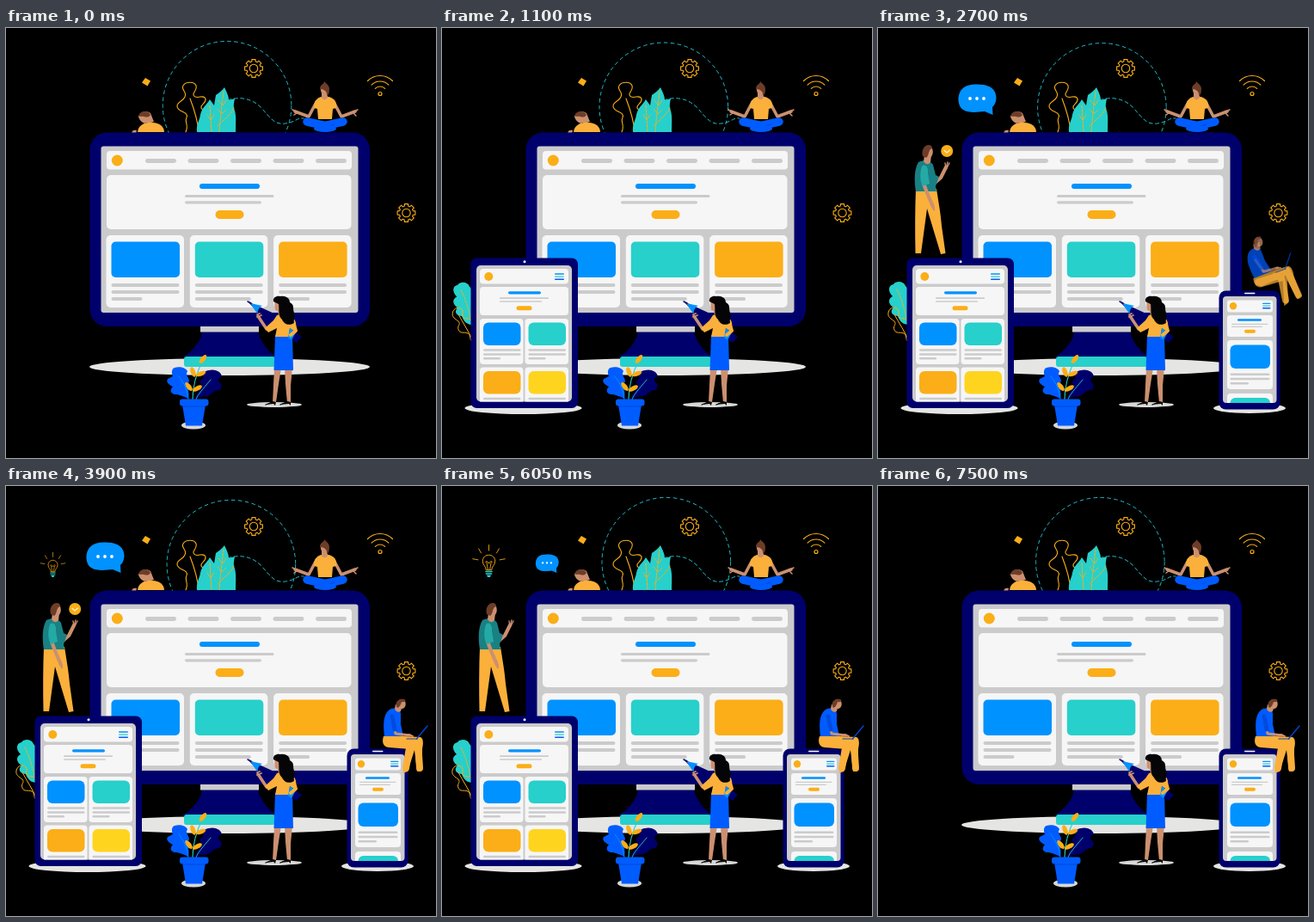
An HTML page with a canvas for the animation above (7.55 s loop, 500 by 500 pixels).

```html
<!DOCTYPE html>
<html lang="en">
<head>
<meta charset="utf-8">
<title>Responsive design</title>
<style>
html, body { margin: 0; width: 100%; height: 100%; overflow: hidden; background: #000; }
canvas { display: block; width: 100vw; height: 100vh; }
</style>
</head>
<body>
<canvas id="stage"></canvas>
<script>
const LOOP = 7550, STEP = 50;
const NAVY = '#00006c', BLUE = '#0092ff', ROYAL = '#005cff', TEAL = '#27d0cb',
  ORANGE = '#fbae17', SHIRT = '#fbb03b', YELLOW = '#ffd41f', PAPER = '#f6f6f7',
  GRAY = '#cbcbcc', FLOOR = '#e5e5e3', SKIN = '#cc906f', HAIR = '#6d3d28';
const canvas = document.getElementById('stage');
const c = canvas.getContext('2d');
const dpr = window.devicePixelRatio || 1;
canvas.width = canvas.height = 500 * dpr;

const clamp = v => Math.max(0, Math.min(1, v));
function ease(t, a, b) {
  const p = clamp((t - a) / (b - a));
  return p * p * (3 - 2 * p);
}
const span = (t, a, b, d, e) => ease(t, a, b) * (1 - ease(t, d, e));

function rect(x1, y1, x2, y2, r, color) {
  c.fillStyle = color;
  c.beginPath();
  c.roundRect(x1, y1, x2 - x1, y2 - y1, r);
  c.fill();
}
function bar(x1, x2, y, h, color = GRAY) {
  rect(x1, y - h / 2, x2, y + h / 2, h / 2, color);
}
function oval(x, y, rx, ry, color, turn = 0) {
  c.fillStyle = color;
  c.beginPath();
  c.ellipse(x, y, rx, ry, turn, 0, 7);
  c.fill();
}
const dot = (x, y, r, color) => oval(x, y, r, r, color);
function fill(d, color) {
  c.fillStyle = color;
  c.fill(new Path2D(d));
}
function line(d, color, w = 1, dash = []) {
  c.strokeStyle = color;
  c.lineWidth = w;
  c.lineCap = 'round';
  c.lineJoin = 'round';
  c.setLineDash(dash);
  c.stroke(new Path2D(d));
  c.setLineDash([]);
}
// Draws a group scaled, turned and faded about a pivot
function group(x, y, scale, turn, alpha, draw) {
  if (scale <= 0.002 || alpha <= 0) return;
  c.save();
  c.translate(x, y);
  c.rotate(turn * Math.PI / 180);
  c.scale(scale, scale);
  c.translate(-x, -y);
  c.globalAlpha = alpha;
  draw();
  c.restore();
}

function orbit(t) {
  const a = t / 9000 * 2 * Math.PI;
  c.strokeStyle = '#22bccb';
  c.lineWidth = 1;
  c.lineCap = 'butt';
  c.setLineDash([4.5, 3.5]);
  c.beginPath();
  c.arc(259.6 - 2.5 * Math.cos(a), 90.2 + 2.3 * Math.sin(a), 74.8, 0, 2 * Math.PI);
  c.stroke();
  c.setLineDash([]);
  line('M258 84C271 79 287 82 297 93S312 113 325 111S338 104 346 105', '#22bccb', 1, [4, 3.5]);
}

function gear(x, y) {
  c.strokeStyle = ORANGE;
  c.lineWidth = 1.1;
  c.lineJoin = 'round';
  c.beginPath();
  for (let i = 0; i < 8; i++) {
    const a = i * Math.PI / 4 - Math.PI / 2;
    for (const [da, r] of [[-.27, 8.2], [-.2, 10.6], [.2, 10.6], [.27, 8.2]])
      c.lineTo(x + r * Math.cos(a + da), y + r * Math.sin(a + da));
  }
  c.closePath();
  c.stroke();
  c.beginPath();
  c.arc(x, y, 4.7, 0, 7);
  c.stroke();
}

function wifi() {
  c.strokeStyle = ORANGE;
  c.lineWidth = 1.2;
  c.lineCap = 'round';
  for (const r of [8, 14, 20.5]) {
    c.beginPath();
    c.arc(435, 76, r, -Math.PI * .75, -Math.PI * .25);
    c.stroke();
  }
  c.beginPath();
  c.arc(435, 76.5, 2, 0, 7);
  c.stroke();
}

function topPlants() {
  line('M209 121C213 113 207 109 210 104C213 97 199 98 199 91C199 85 206 86 208 80C211 74 203 72 206 67C209 62 219 62 221 67C223 73 214 77 220 80C225 82 229 77 232 82C233 88 226 88 227 93C229 98 234 94 232 98', ORANGE, 1.1);
  line('M214 82C219 95 223 107 224 121', ORANGE, 1.1);
  fill('M222 121C221 112 225 108 226 101C228 92 233 90 237 83L242 90L244 78C248 75 251 73 254 69C256 74 259 78 259 84L266 82C265 88 264 91 266 96C268 104 267 112 267 121Z', TEAL);
  line('M237 90L239 121M253 74C251 90 249 106 248 121M265 93C260 102 252 108 246 114', ORANGE, 1, [3, 1.5]);
  line('M247 84L252 90L256 84M246 94L251 100L256 95M234 101L238 107L242 101', ORANGE, .8);
}

function napper() {
  fill('M153 121C154 112 163 109 170 110C179 110 184 115 184 121Z', SHIRT);
  fill('M154 103C156 97 163 95 168 99L172 109C167 111 164 109 162 111C158 110 155 107 154 103Z', SKIN);
  fill('M155 100C158 96 166 96 168 101C165 106 161 102 155 103Z', HAIR);
  fill('M146 123C146 119 149 118 152 119L151 123Z', SKIN);
  fill('M162 58L168 61.5L164.5 67.5L158 63.5Z', ORANGE);
}

function yogi() {
  line('M361 86L352 103L336 97M381 86L390 103L406 97', SKIN, 3.6);
  line('M337 97L333 95M338 99L335 101M405 97L409 95M404 99L407 102', SKIN, 1.5);
  fill('M364 81C368 79 374 79 378 81C383 83 385 88 384 93L380 94L379 106H363L362 94L358 93C358 87 360 83 364 81Z', SHIRT);
  fill('M367 74H374V81C372 84 369 84 367 81Z', SKIN);
  oval(370.5, 71.5, 4.6, 6.3, SKIN);
  fill('M365 71C365 65 370 66 370 62C372 65 376 66 376 71C376 75 375 78 373 79C374 74 370 71 365 71Z', HAIR);
  line('M350 109L378 115M392 109L364 115', ROYAL, 9.5);
  line('M369 116.5L382 112', '#0046d4', 1);
  oval(371, 117, 13, 4, ROYAL);
}

function monitor() {
  oval(260, 394, 163, 10, FLOOR);
  fill('M228 353H293C295 364 304 376 315 383H205C217 376 227 364 228 353Z', NAVY);
  rect(226, 346, 294, 353.5, 0, GRAY);
  rect(207, 382, 313, 394, 3, TEAL);
  rect(97.5, 121.5, 423, 347, 20, NAVY);
  rect(110.5, 137.5, 409.5, 331, 3, GRAY);
  rect(117, 143, 402, 164.5, 4, PAPER);
  dot(129.3, 154, 6.5, ORANGE);
  for (let i = 0; i < 5; i++) bar(162 + i * 49.5, 198 + i * 49.5, 154.5, 4.8);
  rect(117, 171, 401.5, 234, 5, PAPER);
  bar(225, 295, 184, 6, BLUE);
  bar(208, 311.5, 195.5, 3.2);
  bar(208, 297, 202.8, 3.2);
  bar(243.5, 276.5, 217, 10, ORANGE);
  [[BLUE, 36], [TEAL, 65], [ORANGE, 36]].forEach(([color, w], i) => {
    const x = 122.5 + i * 97.3;
    rect(x - 6, 241, x + 84.5, 325, 5, PAPER);
    rect(x, 248.5, x + 79.5, 290, 5, color);
    bar(x, x + 79, 299, 4);
    bar(x, x + 79, 307, 4);
    bar(x, x + w, 315, 4);
  });
}

function woman() {
  oval(312, 438, 32, 3, '#d8d8d6');
  fill('M312 395H320L317 414L314 435L310 436L311 415Z', SKIN);
  fill('M324 395H333L331 416L331 435L327 436L325 414Z', SKIN);
  fill('M302 438L310 434L314 435L313 439L311 437ZM318 438L327 434L331 435L331 439L329 437Z', '#08080c');
  line('M302 438L310 435M319 438L327 435', '#08080c', 1.3);
  fill('M313 357H333L334 398H311.5Z', ROYAL);
  fill('M281 318L314 333L311 341L297 335Z', NAVY);
  fill('M284 320L298 323C294 325 293 328 292 332Z', BLUE);
  line('M281 318L285 320', NAVY, 1.4);
  line('M303 350L297 341L293 335', SKIN, 3.5);
  line('M292 333L295 332M292 336L297 334', SKIN, 1.8);
  fill('M315 334C322 331 333 333 336 340C339 346 336 351 333 354V359H313L315 349L305 354L301 349L311 340Z', SHIRT);
  fill('M330 349L344 359L338 366L329 360Z', NAVY);
  fill('M330 349L337 354L332 363L328 360Z', BLUE);
  line('M335 345L337 352L331 357', SHIRT, 4);
  fill('M312 318L321 316V332C319 335 316 334 316 329L313 328Z', SKIN);
  fill('M311 318C310 313 315 311 319 312C325 311 330 314 330 319C336 322 333 326 335 331C337 336 334 338 335 343C329 347 323 344 321 339C316 335 318 328 317 321Z', '#050508');
}

function pot() {
  oval(218, 462, 14, 4.5, '#d6d8d8');
  fill('M212 431C206 428 201 426 196 426C190 424 191 420 194 417C188 414 186 411 188 408L194 405C192 400 193 396 196 395C202 393 209 395 211 399C208 404 213 406 213 411C209 416 214 421 212 431Z', ROYAL);
  fill('M220 431C221 424 227 421 228 415C223 412 227 409 230 407C227 402 232 398 236 398C242 396 250 399 251 405C246 407 247 409 248 412C252 414 251 419 248 421C240 421 240 427 234 428C228 429 223 429 220 431Z', NAVY);
  line('M201 405C208 414 211 422 212 432', BLUE, .9);
  line('M238 409C228 421 223 426 221 432', TEAL, .9);
  line('M217 432C217 416 222 400 229 386', TEAL, 1.1);
  for (const [x, y, a] of [[229, 385, -.9], [217.5, 400, 1.2], [226.5, 402, -.35], [212.5, 417, .9], [222.5, 419, -.5]])
    oval(x, y, 6, 2.7, ORANGE, a);
  rect(202, 431.5, 235.5, 439.5, 3, ROYAL);
  fill('M205 438H232L228 462.5H209Z', ROYAL);
  line('M206 440H231', '#0048cf', 1);
}

function sidePlants() {
  fill('M36 345C29 345 25 341 23 335C15 334 14 329 18 325C12 321 11 315 17 312C11 306 12 299 18 298C22 293 30 295 32 300L37 306Z', TEAL);
  line('M22 304C28 316 31 328 34 341', ORANGE, .9, [3, 1.5]);
  line('M35 365C31 361 34 357 30 355C25 353 21 356 19 351C17 346 22 345 19 341C15 338 11 336 12 331C13 325 20 323 23 327C26 331 21 335 26 337C30 339 33 336 35 341M19 333C25 344 31 353 35 362', ORANGE, 1);
}

function menu(x1, x2, y, gap) {
  [BLUE, TEAL, ROYAL].forEach((color, i) => bar(x1, x2, y + i * gap, 1.4, color));
}

function tablet() {
  oval(94.5, 442, 68, 7, FLOOR);
  rect(33.5, 267.5, 158, 442, 7, NAVY);
  dot(96, 271.8, 1.5, '#fff');
  rect(40, 276, 151, 434.5, 5, GRAY);
  c.save();
  c.beginPath();
  c.roundRect(40, 276, 111, 158.5, 5);
  c.clip();
  rect(44, 280, 147, 297.5, 4, PAPER);
  dot(54.3, 289, 5, ORANGE);
  menu(131, 142, 286, 3.1);
  rect(44, 301, 147, 334, 4, PAPER);
  bar(77, 115, 307.8, 3.2, BLUE);
  bar(67, 124, 314.2, 1.7);
  bar(67, 116, 318, 1.7);
  bar(86.5, 104.5, 325.8, 5, ORANGE);
  [BLUE, TEAL, ORANGE, YELLOW].forEach((color, i) => {
    const x = 48 + (i % 2) * 52.5, y = 338 + (i >> 1) * 56.5;
    rect(x - 4, y, x + 46.5, y + 53, 4, PAPER);
    rect(x, y + 4.5, x + 43.5, y + 31, 6, color);
    bar(x, x + 43.5, y + 36.5, 2.5);
    bar(x, x + 43.5, y + 41.5, 2.5);
    bar(x, x + 20, y + 46.3, 2.5);
  });
  c.restore();
}

function phone() {
  oval(432, 442, 42, 6, FLOOR);
  rect(396.5, 305.5, 467.5, 443.5, 8, NAVY);
  bar(426, 438.5, 308.6, 1.5, '#fff');
  rect(401, 312, 463.5, 436, 4, GRAY);
  c.save();
  c.beginPath();
  c.roundRect(401, 312, 62.5, 124, 4);
  c.clip();
  rect(406, 316.5, 459, 330.5, 3, PAPER);
  dot(413, 323.3, 4.2, ORANGE);
  menu(447, 456.5, 320.4, 2.7);
  rect(406, 334, 459, 359, 3, PAPER);
  bar(418, 446, 339.6, 2.5, BLUE);
  bar(411, 453.5, 344.3, 1.3);
  bar(411, 447, 347.3, 1.3);
  bar(426, 439, 352.8, 4, ORANGE);
  rect(406, 363, 459, 420, 4, PAPER);
  rect(409.5, 368.5, 456, 396, 6, BLUE);
  bar(409.5, 455.5, 402.8, 2.6);
  bar(409.5, 455.5, 408, 2.6);
  bar(409.5, 431, 413.2, 2.6);
  rect(406, 425, 459, 450, 4, PAPER);
  rect(409.5, 430, 456, 456, 6, TEAL);
  c.restore();
}

function stander() {
  fill('M44 187H68C70 200 73 216 74 230L78.5 262L73 263L57 210L50 262H43.5C43 236 43 212 44 187Z', SHIRT);
  line('M65 181L73 174L79 162', SKIN, 4.2);
  line('M79 163L78 157M80 163L83 157M79.5 162L81 156', SKIN, 1.4);
  fill('M47 156C53 153 61 154 64 159L67 171L71 173L67 184L68 190H44C42 178 42 164 47 156Z', '#198084');
  fill('M54 148H62L61 156C58 160 55 158 53 155Z', SKIN);
  oval(59, 144, 4.8, 7, SKIN);
  fill('M52 149C50 142 54 136 59 136C62 136 63 138 63 140C58 141 60 148 56 151Z', HAIR);
  line('M53 181L58 194L64 208', SKIN, 4.2);
  line('M63 205L65 211', SKIN, 2.6);
  fill('M51 161C55 157 59 162 58 169L60 181L52 184C48 176 49 167 51 161Z', '#24aaa5');
}

function ball() {
  dot(80.2, 143, 7, ORANGE);
  line('M77 142.3L80 145L83.5 142', '#fff4d2', 1.2);
}

function bubble() {
  fill('M104 67C112 65 122 65 129 68C139 72 140 86 133 92L133.5 101L124 97C115 98 105 99 99 95C91 90 91 71 104 67Z', BLUE);
  for (const x of [107, 115, 123]) dot(x, 82, 1.9, '#fff');
}

function bulb() {
  line('M50 94C50 88 44.5 87 44.5 80C44.5 67 64.5 67 64.5 80C64.5 87 59 88 59 94Z', ORANGE, 1.3);
  line('M53 94L51 83C47 81 52 78 53 83H56C57 78 62 81 58 83L56 94', ORANGE, 1.2);
  line('M49.5 97H59.5M50 100.5H59', TEAL, 2);
  fill('M51 102.5H58L56.5 106H52.5Z', TEAL);
  line('M54.5 54V63M38 60L42 67M71 60L67 67M28.5 76.5L37 78M80.5 76.5L72 78', ORANGE, 1.2);
}

function sitter() {
  line('M443 297L470 299L465 328M446 299L479 297L481 328', SHIRT, 8);
  fill('M439 291H462L482 292C486 294 485 301 484 306V330L478 332L475 307L467 332L461 334L470 306L445 304C438 303 437 297 439 291Z', SHIRT);
  line('M477.5 294L490 279', '#0048d8', 1.3);
  line('M466 294H478', '#0a3ca8', 1.2);
  fill('M443 263C448 256 457 258 459 264L459 277L462 291H440C439 281 438 270 443 263Z', ROYAL);
  line('M449 272L453 288L470 290', SKIN, 3);
  line('M468 289L473 291', SKIN, 2);
  line('M449 268L452 283', '#004be0', 5);
  fill('M453 254H461L459 262C456 264 453 262 452 259Z', SKIN);
  oval(460, 253.5, 4.7, 5.7, SKIN);
  fill('M454 256C452 250 458 247 463 248C466 249 464 252 460 251C459 254 458 257 455 258Z', HAIR);
}

function draw(t) {
  c.setTransform(dpr, 0, 0, dpr, 0, 0);
  c.fillStyle = '#000';
  c.fillRect(0, 0, 500, 500);

  orbit(t);
  gear(288, 47);
  gear(465.5, 215);
  wifi();
  topPlants();
  napper();
  monitor();
  yogi();
  woman();
  pot();

  group(36, 352, span(t, 400, 1150, 6100, 6430), 0, 1, sidePlants);
  const stand = span(t, 1300, 1800, 6250, 6650);
  group(60, 262, 1, -14 * (1 - stand), stand, stander);
  group(80, 150, span(t, 2100, 2450, 4550, 4950), 0, 1, ball);
  group(133, 101, span(t, 1850, 2300, 5850, 6320), 0, 1, bubble);
  group(54.5, 106, span(t, 3580, 4180, 5900, 6330), 0, 1, bulb);
  group(95, 355, span(t, 50, 500, 6700, 7300), 0, 1, tablet);
  group(432, 375, ease(t, 1950, 2450), 0, 1, phone);
  group(438, 298, 1, -42 * (1 - ease(t, 2400, 3000)), clamp((t - 2450) / 350), sitter);
}

function tick(now) {
  draw(Math.floor(now % LOOP / STEP) * STEP);
  requestAnimationFrame(tick);
}
tick(0);
</script>
</body>
</html>
```
